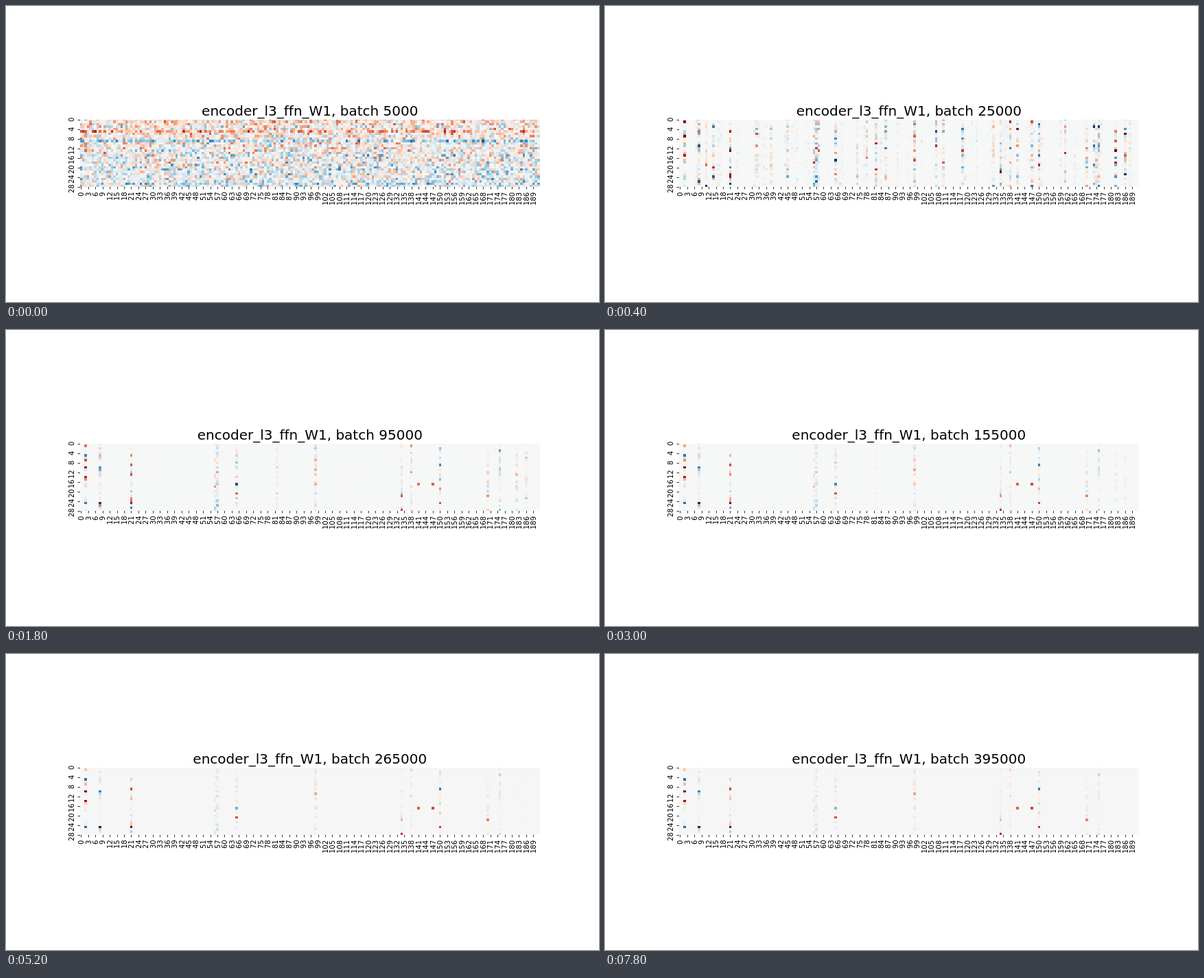
Animation, 864 px wide and 432 px high, one loop 8000 ms. Source, as an HTML page with a canvas:

```html
<!DOCTYPE html>
<html lang="en">
<head>
<meta charset="utf-8">
<title>Weight heatmap</title>
<style>
html, body { margin: 0; width: 100%; height: 100%; overflow: hidden; background: #fff; }
canvas { display: block; }
</style>
</head>
<body>
<canvas id="stage" width="864" height="432"></canvas>
<script>
const ctx = document.getElementById('stage').getContext('2d');
const COLS = 192, ROWS = 29, LEFT = 108, TOP = 166, RIGHT = 778, BOTTOM = 264;
const CELL = 669.6 / COLS;
const STEP = 200, STEPS = 40;

const ramp = ['053061', '2166ac', '4393c3', '92c5de', 'd1e5f0', 'f7f7f7',
  'fddbc7', 'f4a582', 'd6604d', 'b2182b', '67001f']
  .map(h => [0, 2, 4].map(i => parseInt(h.substr(i, 2), 16)));

// Columns by how long their weights survive
const lasting = new Set([2, 8, 21, 56, 57, 65, 98, 134, 138, 150, 170, 175]);
const slow = new Set([82, 182, 186]);
const brief = new Set([11, 14, 32, 38, 45, 58, 74, 78, 86, 107, 110, 118, 131, 141, 147, 161, 173, 174]);

// Weights that grow while the rest fade: column, row, value
const peaks = [[2, 5, -.75], [2, 10, .93], [2, 14, .85], [2, 25, -.78], [8, 10, -.65], [8, 25, 1],
  [21, 9, .66], [21, 25, 1], [65, 21, .65], [98, 11, .4], [134, 28, .75], [141, 17, .6],
  [147, 17, .67], [150, 9, -.7], [150, 25, .7], [170, 22, .5]];
const peakAt = new Map(peaks.map(([c, r, v]) => [c * ROWS + r, v]));

const clamp = (v, lo, hi) => Math.max(lo, Math.min(hi, v));

function rand(c, r, s) {
  let h = Math.imul(c + 1, 374761393) ^ Math.imul(r + 1, 668265263) ^ Math.imul(s + 1, 1274126177);
  h = Math.imul(h ^ (h >>> 13), 1274126177);
  h = Math.imul(h ^ (h >>> 16), 2246822519);
  return ((h ^ (h >>> 15)) >>> 0) / 4294967296;
}

// Roughly normal, deviation 1
const bell = (c, r, s) =>
  (rand(c, r, s) + rand(c, r, s + 1) + rand(c, r, s + 2) - 1.5) * 2;

// Many small values and a few large ones
function tail(c, r) {
  const b = bell(c, r, 20);
  return .7 * b * Math.abs(b);
}

// Rows drift from red to blue, with a few marked bands
function rowBias(r) {
  const drift = .12 - .2 * r / (ROWS - 1);
  if (r === 5) return .3;
  if (r === 9) return -.3;
  return r % 6 === 3 ? drift - .12 : drift;
}

const dense = (c, r) => rowBias(r) + .23 * bell(c, r, 3);

function sparse(c, r, k) {
  const age = k - 2;
  const peak = peakAt.get(c * ROWS + r);
  const grown = peak === undefined ? 0 : peak * (1 - Math.exp(-k / 4));
  if (grown) return grown;
  if (lasting.has(c)) return tail(c, r) * (.08 + .2 * Math.exp(-age / 8));
  if (slow.has(c)) return tail(c, r) * .26 * Math.exp(-age / 6);
  const size = brief.has(c) ? .22 : .07 * rand(c, 0, 50) ** 5;
  return tail(c, r) * size * Math.exp(-age / 2);
}

function weight(c, r, k) {
  if (k === 0) return dense(c, r);
  if (k === 1) return .3 * dense(c, r) + .8 * sparse(c, r, 2);
  return sparse(c, r, k);
}

function color(v) {
  const p = clamp(v * 5 + 5, 0, 10), i = Math.min(9, Math.floor(p));
  const mix = ramp[i].map((a, n) => Math.round(a + (ramp[i + 1][n] - a) * (p - i)));
  return `rgb(${mix})`;
}

const cellX = c => c >= COLS ? RIGHT : Math.floor(LEFT + c * CELL);
const cellY = r => clamp(Math.floor(TOP + (r - .5) * CELL), TOP, BOTTOM);

function drawCells(k) {
  ctx.fillStyle = k < 25 ? '#f6f7f7' : '#f6f6f6';
  ctx.fillRect(LEFT, TOP, RIGHT - LEFT, BOTTOM - TOP);
  for (let c = 0; c < COLS; c++) {
    const x = cellX(c), w = cellX(c + 1) - x;
    for (let r = 0; r < ROWS; r++) {
      const v = weight(c, r, k);
      if (Math.abs(v) < .01) continue;
      const y = cellY(r);
      ctx.fillStyle = color(v);
      ctx.fillRect(x, y, w, cellY(r + 1) - y);
    }
  }
}

// Text running upwards, its upper end near top, snapped to whole pixels
function upright(text, x, top) {
  ctx.save();
  ctx.translate(Math.round(x), Math.ceil(top + ctx.measureText(text).width));
  ctx.rotate(-Math.PI / 2);
  ctx.fillText(text, 0, 0);
  ctx.restore();
}

function drawTick(x, y, w, h) {
  ctx.fillStyle = 'rgba(0,0,0,.8)';
  ctx.fillRect(x, y, w, h);
  ctx.fillStyle = '#000';
}

function drawAxes() {
  ctx.font = '10px "DejaVu Sans", sans-serif';
  ctx.textAlign = 'left';
  for (let c = 0; c < COLS; c += 3) {
    const x = LEFT + (c + .5) * CELL;
    drawTick(Math.floor(x), BOTTOM, 1, 3.5);
    upright(c, x + 3.3, 271);
  }
  for (let r = 0; r < ROWS; r += 4) {
    const y = TOP + r * CELL;
    drawTick(LEFT - 3.5, Math.round(y), 3.5, 1);
    upright(r, 99, y - 3.7);
  }
}

function draw(k) {
  ctx.fillStyle = '#fff';
  ctx.fillRect(0, 0, 864, 432);
  ctx.textRendering = 'optimizeSpeed';
  drawCells(k);
  drawAxes();
  ctx.font = '20px "DejaVu Sans", sans-serif';
  ctx.textAlign = 'center';
  ctx.fillText(`encoder_l3_ffn_W1, batch ${5000 + k * 10000}`, 442.8, 160);
}

const begin = performance.now();
let shown = 0;
draw(0);

function tick() {
  const k = Math.floor((performance.now() - begin) / STEP) % STEPS;
  if (k !== shown) draw(shown = k);
  requestAnimationFrame(tick);
}
requestAnimationFrame(tick);
</script>
</body>
</html>
```
